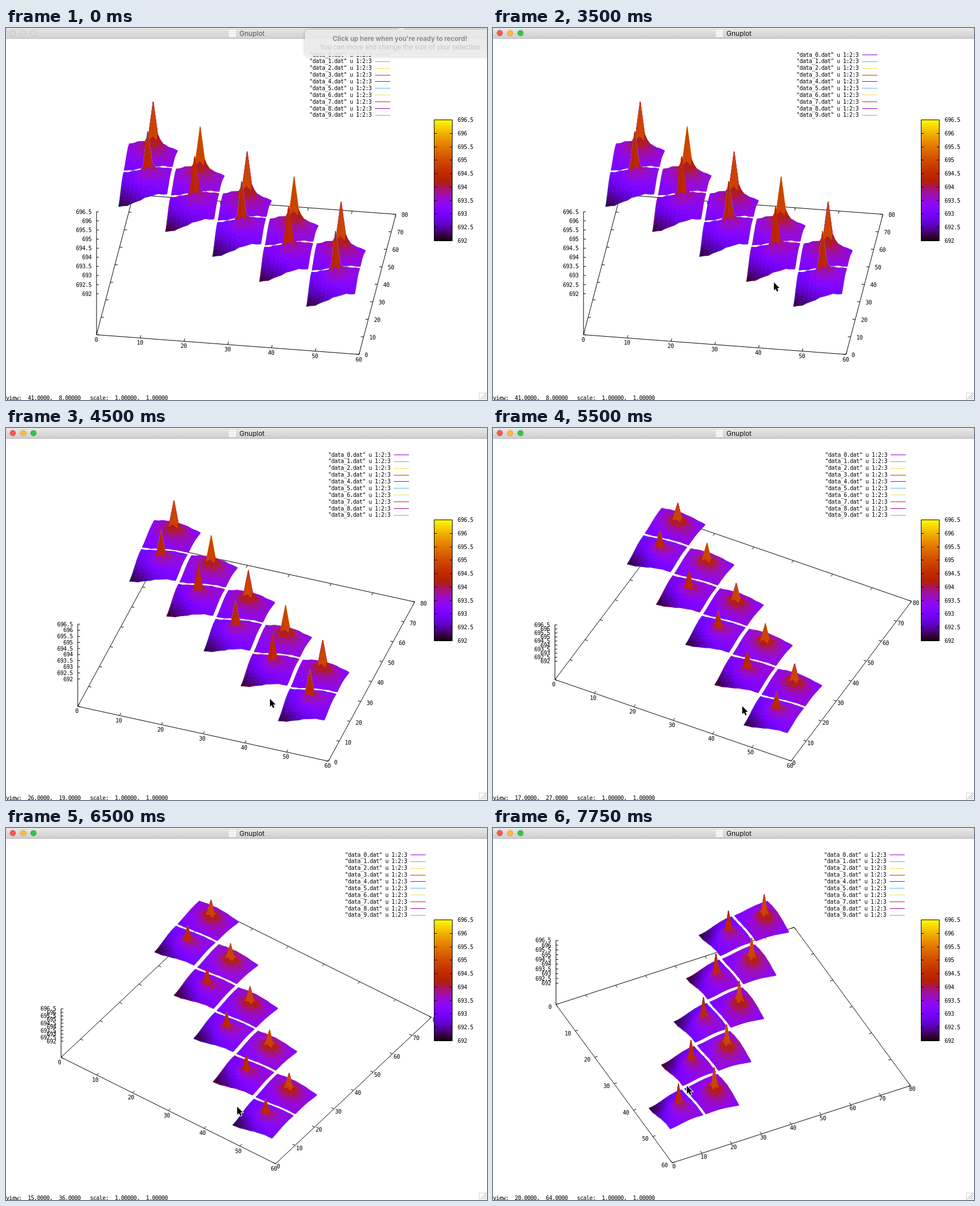
An HTML page with a canvas that plays this animation: 851 by 658 pixels, repeating every 8000 ms.

```html
<!DOCTYPE html>
<html lang="en">
<head>
<meta charset="utf-8">
<title>Gnuplot</title>
<style>
html, body { margin: 0; width: 100%; height: 100%; overflow: hidden; background: #fff; }
canvas { display: block; }
</style>
</head>
<body>
<canvas id="stage" width="851" height="658"></canvas>
<script>
const ctx = document.getElementById('stage').getContext('2d');
const LOOP = 8000, STEP = 250, SIDE = 11;
const MONO = '10px "DejaVu Sans Mono", monospace';
const LINE_COLORS = ['#9400d3', '#56b4e9', '#f0e442', '#e51e10'];

// time, view tilt, view turn, pointer x, pointer y
const KEYS = [
  [750, 41, 8, 690, 1],
  [1500, 41, 8, 478, 458],
  [1750, 41, 8, 467, 448],
  [2250, 41, 8, 467, 448],
  [3000, 41, 8, 497, 450],
  [3500, 41, 8, 497, 450],
  [4500, 26, 19, 467, 479],
  [5500, 17, 27, 441, 492],
  [6500, 15, 36, 409, 493],
  [7750, 20, 64, 343, 456]
];

// corner heights above 692, peak height and edge bulge of the two tile kinds
const BACK = { corners: [1.04, 1.42, 1.4, 1.2], peak: 4.3, bulge: 0.2 };
const FRONT = { corners: [0.2, 1.06, 1, 1.37], peak: 3.82, bulge: 0 };

const mix = (a, b, k) => a + (b - a) * k;
const smooth = k => k * k * (3 - 2 * k);

function stateAt(t) {
  if (t <= KEYS[0][0]) return KEYS[0];
  const n = KEYS.findIndex(key => key[0] >= t);
  const a = KEYS[n - 1], b = KEYS[n];
  return a.map((v, i) => mix(v, b[i], (t - a[0]) / (b[0] - a[0])));
}

function makeHeights({ corners, peak, bulge }) {
  const ground = (i, j) => {
    const u = smooth(i / SIDE), v = smooth(j / SIDE);
    return mix(mix(corners[0], corners[1], u), mix(corners[2], corners[3], u), v)
      + bulge * Math.sin(Math.PI * i / SIDE) * v + 0.025 * Math.sin(i * 2.3 + j * 3.1);
  };
  const spike = r => 3.1 / (1 + 1.25 * r) - 0.3;
  const lift = peak - ground(6, 6) - spike(0);
  return (i, j) => {
    const r = Math.hypot(i - 6, j - 6);
    return ground(i, j) + spike(r) + lift * Math.max(0, 1 - r / 5);
  };
}
const backHeight = makeHeights(BACK), frontHeight = makeHeights(FRONT);

function palette(g) {
  g = Math.min(1, Math.max(0, g));
  const blue = Math.max(0, Math.sin(2 * Math.PI * g));
  return `rgb(${[Math.sqrt(g), g ** 3, blue].map(c => Math.round(c * 255))})`;
}

function makeView(tilt, turn) {
  const rad = Math.PI / 180;
  const ct = Math.cos(tilt * rad), st = Math.sin(tilt * rad);
  const cz = Math.cos(turn * rad), sz = Math.sin(turn * rad);
  const depth = (x, y) => (y / 40 - 1) * cz - (x / 30 - 1) * sz;
  const at = (x, y, z) => [
    425 + 234.5 * ((x / 30 - 1) * cz + (y / 40 - 1) * sz),
    327.3 - 165.8 * (depth(x, y) * ct + z * st)
  ];
  return {
    turn, depth,
    floor: (x, y) => at(x, y, -1),
    point: (x, y, h) => at(x, y, h / 4.5 * 4 / 3 - 1 / 3)
  };
}

function text(s, x, y, align = 'left', color = '#000', font = MONO) {
  ctx.font = font;
  ctx.letterSpacing = font === MONO ? '-0.52px' : '0px';
  ctx.textAlign = align;
  ctx.textBaseline = 'alphabetic';
  ctx.fillStyle = color;
  ctx.fillText(s, x, y + 3.6);
}

function trace(points, closed) {
  ctx.beginPath();
  points.forEach(p => ctx.lineTo(...p));
  if (closed) ctx.closePath();
}

function line(points, color = '#000', width = 1, closed = false) {
  trace(points, closed);
  ctx.strokeStyle = color;
  ctx.lineWidth = width;
  ctx.stroke();
}

function tick(p, q) {
  const k = 5 / Math.hypot(q[0] - p[0], q[1] - p[1]);
  line([p, [mix(p[0], q[0], k), mix(p[1], q[1], k)]]);
}

function drawAxes(view) {
  const { floor, point, turn } = view;
  line([floor(0, 0), floor(60, 0), floor(60, 80), floor(0, 80)], '#000', 1, true);
  for (let x = 0; x <= 60; x += 10) {
    const p = floor(x, 0), q = floor(x, 80);
    tick(p, q);
    tick(q, p);
    if (turn > 45) text(x, p[0] - 8, p[1] + 4, 'right');
    else text(x, p[0] - turn / 12, p[1] + 8.5, 'center');
  }
  for (let y = 0; y <= 80; y += 10) {
    const p = floor(60, y), q = floor(0, y);
    tick(p, q);
    tick(q, p);
    if (turn > 45) text(y, p[0] + 3, p[1] + 6, 'center');
    else text(y, p[0] + (turn < 23 ? 10 : 2), p[1] + Math.min(turn / 8, 4.5));
  }
  line([floor(0, 0), point(0, 0, 4.5)]);
  for (let h = 0; h <= 4.5; h += 0.5) {
    const [x, y] = point(0, 0, h);
    line([[x, y], [x + 4, y]]);
    text(692 + h, x - 9, y, 'right');
  }
}

function drawTile(view, x0, y0, height, color) {
  const cells = [];
  for (let i = 0; i < SIDE; i++) {
    for (let j = 0; j < SIDE; j++) {
      const corners = [[i, j], [i + 1, j], [i + 1, j + 1], [i, j + 1]];
      const mean = corners.reduce((sum, c) => sum + height(...c), 0) / 4;
      cells.push({
        points: corners.map(([a, b]) => view.point(x0 + a, y0 + b, height(a, b))),
        fill: palette(mean / 4.5),
        depth: view.depth(x0 + i, y0 + j)
      });
    }
  }
  cells.sort((a, b) => b.depth - a.depth);
  ctx.lineJoin = 'bevel';
  for (const c of cells) line(c.points, color, 1.3, true);
  for (const c of cells) {
    line(c.points, c.fill, 0.6, true);
    ctx.fillStyle = c.fill;
    ctx.fill();
  }
  ctx.lineJoin = 'miter';
}

function drawLegend(view) {
  const end = view.floor(60, 80)[0] - 10;
  for (let i = 0; i < 10; i++) {
    const y = 47 + i * 11.87;
    text(`"data_${i}.dat" u 1:2:3`, end - 33, y, 'right');
    const row = Math.round(y) + 0.5;
    line([[end - 27, row], [end, row]], LINE_COLORS[i % 4]);
  }
}

function drawColorBox() {
  for (let y = 162; y < 376; y++) {
    ctx.fillStyle = palette((376 - y) / 214);
    ctx.fillRect(757, y, 33, 1);
  }
  ctx.strokeStyle = '#000';
  ctx.lineWidth = 1;
  ctx.strokeRect(757.5, 162.5, 32, 214);
  for (let i = 0; i < 10; i++) {
    const y = Math.round(376 - i * 23.78) + 0.5;
    line([[757, y], [762, y]]);
    line([[785, y], [790, y]]);
    text(692 + i / 2, 799, y - 0.5);
  }
}

function drawTitleBar(active) {
  const bar = ctx.createLinearGradient(0, 0, 0, 18);
  bar.addColorStop(0, active ? '#e9e9e9' : '#e4e4e4');
  bar.addColorStop(1, active ? '#cdcdcd' : '#d2d2d2');
  ctx.fillStyle = bar;
  ctx.fillRect(0, 0, 851, 19);
  line([[0, 18.5], [851, 18.5]], '#b8b8b8');
  ['#fc5753', '#fdbc40', '#33c748'].forEach((color, i) => {
    ctx.beginPath();
    ctx.arc(12 + i * 18.3, 9, 5.2, 0, 7);
    ctx.fillStyle = active ? color : '#dadada';
    ctx.fill();
    ctx.strokeStyle = active ? 'rgba(0,0,0,.15)' : '#c2c2c2';
    ctx.stroke();
  });
  ctx.fillStyle = '#f2f2f2';
  ctx.fillRect(394, 3, 13, 13);
  text('Gnuplot', 413, 10, 'left', active ? '#111' : '#555', '12px Inter, sans-serif');
}

function drawNotice() {
  ctx.save();
  ctx.shadowColor = 'rgba(0,0,0,.25)';
  ctx.shadowBlur = 6;
  ctx.fillStyle = 'rgba(242,242,242,.86)';
  ctx.beginPath();
  ctx.roundRect(529, 3, 330, 47, 6);
  ctx.moveTo(692, 3);
  ctx.lineTo(699, -3);
  ctx.lineTo(706, 3);
  ctx.fill();
  ctx.restore();
  text("Click up here when you're ready to record!", 697, 19, 'center', '#8c8c8c', 'bold 11.5px Inter, sans-serif');
  text('You can move and change the size of your selection', 697, 34, 'center', '#c4c4c4', '11.5px Inter, sans-serif');
}

function drawStatus(tilt, turn) {
  const six = n => n.toPrecision(6);
  text(`view:  ${six(tilt)},  ${six(turn)}   scale:  1.00000,  1.00000`, 0, 654);
  ctx.strokeStyle = '#d4d4d4';
  ctx.strokeRect(837.5, 645.5, 15, 15);
  for (let d = 4; d <= 12; d += 4) line([[851 - d, 657], [850, 658 - d]], '#999');
}

function drawPointer(x, y) {
  const shape = [[0, 0], [0, 14], [3.2, 11.2], [5.4, 16.2], [7.9, 15.1], [5.7, 10.3], [10, 10.1]];
  const points = shape.map(([a, b]) => [x + a, y + b]);
  line(points, '#fff', 2, true);
  ctx.fillStyle = '#000';
  ctx.fill();
}

function draw(t) {
  const [, rawTilt, rawTurn, px, py] = stateAt(t);
  const tilt = Math.round(rawTilt), turn = Math.round(rawTurn);
  const view = makeView(tilt, turn);
  ctx.fillStyle = '#fff';
  ctx.fillRect(0, 0, 851, 658);
  drawAxes(view);
  drawLegend(view);
  for (let k = 0; k < 5; k++) {
    const x = 12 * k, y = 48 - 12 * k;
    drawTile(view, x, y + 12, backHeight, LINE_COLORS[2 * k % 4]);
    drawTile(view, x, y, frontHeight, LINE_COLORS[(2 * k + 1) % 4]);
  }
  drawColorBox();
  drawStatus(tilt, turn);
  drawTitleBar(t >= 2000);
  if (t < 250) drawNotice();
  if (t >= 750) drawPointer(px, py);
}

let shown = -1;
function loop() {
  const t = Math.floor(performance.now() % LOOP / STEP) * STEP;
  if (t !== shown) draw(shown = t);
  requestAnimationFrame(loop);
}
loop();
</script>
</body>
</html>
```
